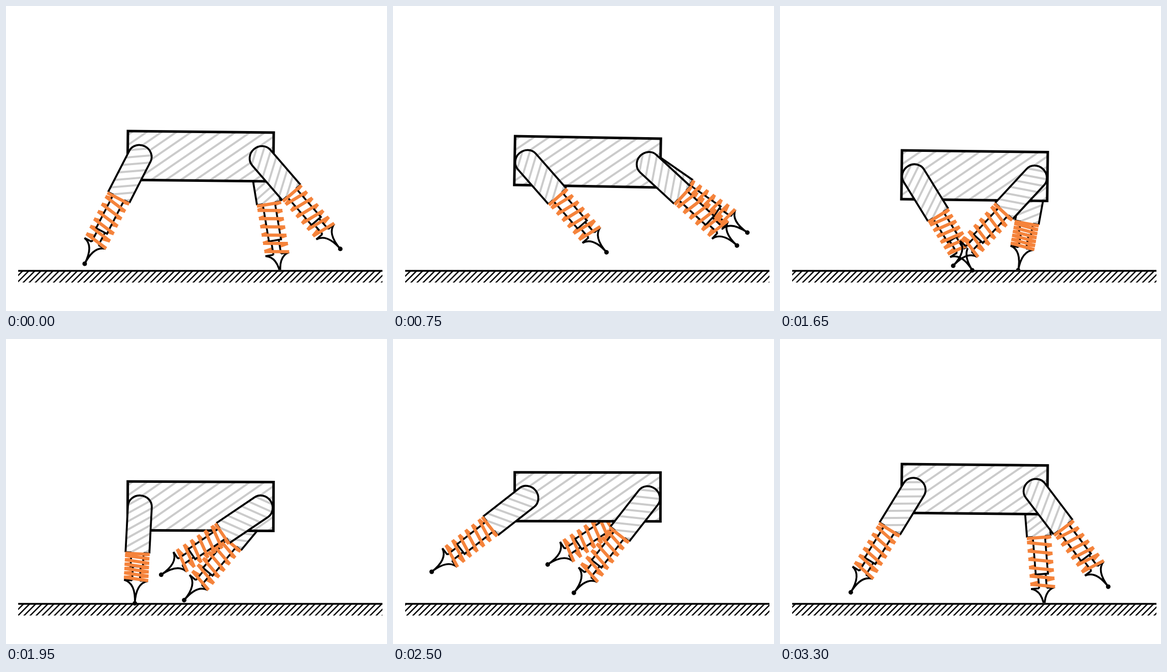
Animation, 750 px wide and 600 px high, one loop 3.35 s. Source, as an HTML page with a canvas:

```html
<!DOCTYPE html>
<html lang="en">
<head>
<meta charset="utf-8">
<title>Spring-legged runner</title>
<style>
html, body { margin: 0; width: 100%; height: 100%; overflow: hidden; background: #fff; }
canvas { display: block; width: 750px; height: 600px; }
</style>
</head>
<body>
<canvas id="stage" width="750" height="600"></canvas>
<script>
const ctx = document.getElementById('stage').getContext('2d');
const LOOP = 3350, STEP = 50, OMEGA = 2 * Math.PI / LOOP, RAD = Math.PI / 180;
const BLACK = '#000', GREY = '#cbcbcb', ORANGE = '#f5833b';
const GROUND = { left: 24, right: 741, top: 521, bottom: 544, gap: 11.95 };
const BODY = { x: 383, w: 287, h: 96, hipX: 119.5, hipY: 1.5 };
const LEG = { half: 23.5, upper: 91, foot: 45, rest: 237.6, sleeve: 12, rod: 7.5, cap: 27.5 };
const SPEED = 2 * (GROUND.right - GROUND.left) / LOOP;
const KEYS = [0, 750, 1200, 1650, 2200, 2850, 3300];

// Periodic cubic through the values at KEYS
function spline(values, t) {
  const n = KEYS.length;
  const at = i => values[(i + n) % n];
  const when = i => KEYS[(i + n) % n] + LOOP * Math.floor(i / n);
  const slope = i => (at(i + 1) - at(i - 1)) / (when(i + 1) - when(i - 1));
  let i = n - 1;
  while (KEYS[i] > t) i--;
  const h = when(i + 1) - when(i), u = (t - when(i)) / h, v = 1 - u;
  return at(i) * v * v * (1 + 2 * u) + at(i + 1) * u * u * (3 - 2 * u)
    + h * u * v * (slope(i) * v - slope(i + 1) * u);
}

// A basic wave plus a smooth correction that meets the given poses
function fit(wave, poses) {
  const rest = poses.map((p, i) => p - wave(KEYS[i]));
  return t => wave(t) + spline(rest, t);
}

const bodyY = fit(t => 314.5 + 19.2 * Math.cos(OMEGA * (t - 1680)),
  [295.5, 306.5, 321.7, 333.7, 320.5, 300, 295.3]);
const bodyTilt = fit(() => 0, [0.6, 0.98, 1.08, 0.7, 0, 0.38, 0.54]);

// mid: the moment of mid-stance
function makeLeg(side, mid, poses) {
  return { side, mid, angle: fit(t => -56 * Math.sin(OMEGA * (t - mid)), poses) };
}
const rear = makeLeg(-1, 1920, [-27.2, 41.3, 54.6, 31.7, -31.4, -55.5, -31.5]);
const near = makeLeg(1, 1255, [40.9, 47.3, 7.2, -42.8, -53.7, -5.7, 37.2]);
const far = makeLeg(1, 1575, [9.4, 55.2, 39.3, -10.4, -54.7, -37.2, 4.5]);

function pen(color, width) {
  ctx.strokeStyle = color;
  ctx.lineWidth = width;
}

function lines(...segments) {
  ctx.beginPath();
  for (const [x1, y1, x2, y2] of segments) {
    ctx.moveTo(x1, y1);
    ctx.lineTo(x2, y2);
  }
  ctx.stroke();
}

// Fill the current path with white and slanted grey lines
function hatch(gap, slant, reach) {
  ctx.fillStyle = '#fff';
  ctx.fill();
  ctx.save();
  ctx.clip();
  ctx.rotate(-slant * RAD);
  pen(GREY, 4);
  const rows = [];
  for (let y = -reach + reach % gap; y <= reach; y += gap) rows.push([-reach, y, reach, y]);
  lines(...rows);
  ctx.restore();
}

function upperPath() {
  const { half, upper } = LEG;
  ctx.beginPath();
  ctx.moveTo(-half, upper);
  ctx.lineTo(-half, 0);
  ctx.ellipse(0, 0, half, 22, 0, Math.PI, 2 * Math.PI);
  ctx.lineTo(half, upper);
}

function drawSpring(top, length, front) {
  const p = length / 12, w = 24, parts = [];
  if (front) parts.push([-w, top, w, top]);
  for (let i = 0; i < 12; i += 2) {
    const y = top + i * p;
    parts.push(front ? [-w, y + p, w, y + 2 * p] : [w, y, -w, y + p]);
  }
  pen(ORANGE, 6.3);
  lines(...parts);
}

function drawFoot(plate) {
  const { half, rod, foot, cap, sleeve } = LEG, tip = plate + foot;
  pen(BLACK, 3.6);
  lines([-half, plate, -rod, plate], [rod, plate, half, plate],
    [-rod, plate, -rod, plate - cap], [rod, plate, rod, plate - cap],
    [-sleeve - 2, plate - cap, sleeve + 2, plate - cap]);
  ctx.beginPath();
  for (const s of [-1, 1]) {
    ctx.moveTo(s * half, plate);
    ctx.quadraticCurveTo(0, plate + 5, 0, tip);
  }
  ctx.stroke();
  ctx.fillStyle = BLACK;
  ctx.beginPath();
  ctx.arc(0, tip, 4.5, 0, 2 * Math.PI);
  ctx.fill();
}

function drawLeg(leg, t, y, tilt) {
  const { half, upper, sleeve, cap } = LEG;
  const hx = leg.side * BODY.hipX;
  const hipX = BODY.x + hx * Math.cos(tilt) - BODY.hipY * Math.sin(tilt);
  const hipY = y + hx * Math.sin(tilt) + BODY.hipY * Math.cos(tilt);
  const angle = leg.angle(t) * RAD;
  // The leg is pressed against the ground only while it sweeps back
  const sweeping = Math.cos(OMEGA * (t - leg.mid)) > 0;
  const toGround = (GROUND.top - 1 - hipY) / Math.cos(angle);
  const length = sweeping ? Math.min(LEG.rest, toGround) : LEG.rest;
  const plate = length - LEG.foot, top = upper + 2, coil = plate - top - 1;

  ctx.save();
  ctx.translate(hipX, hipY);
  ctx.rotate(-angle);

  upperPath();
  hatch(14, 32, 130);
  upperPath();
  pen(BLACK, 3.8);
  ctx.stroke();
  lines([-half, upper, -sleeve, upper], [sleeve, upper, half, upper]);

  drawSpring(top, coil, false);
  ctx.fillStyle = '#fff';
  ctx.fillRect(-sleeve, upper + 1, 2 * sleeve, plate - cap - upper - 1);
  ctx.fillRect(-LEG.rod, plate - cap, 2 * LEG.rod, cap);
  pen(BLACK, 3.6);
  lines([-sleeve, upper, -sleeve, plate - cap], [sleeve, upper, sleeve, plate - cap]);
  drawFoot(plate);
  drawSpring(top, coil, true);
  ctx.restore();
}

function drawGround(t) {
  const { left, right, top, bottom, gap } = GROUND, h = bottom - top;
  ctx.save();
  ctx.beginPath();
  ctx.rect(left, top - 2, right - left, h + 2);
  ctx.fillStyle = '#fff';
  ctx.fill();
  ctx.clip();
  pen(BLACK, 2.5);
  const strokes = [];
  const start = 33 - (SPEED * t) % gap;
  for (let x = start; x < right + 40; x += gap) strokes.push([x, top, x - h - 2, bottom + 2]);
  lines(...strokes);
  pen(BLACK, 3.6);
  lines([left, top, right, top]);
  ctx.restore();
}

function drawBody(y, tilt) {
  const { x, w, h } = BODY;
  ctx.save();
  ctx.translate(x, y);
  ctx.rotate(tilt);
  ctx.beginPath();
  ctx.rect(-w / 2, -h / 2, w, h);
  hatch(16.5, 35, 200);
  pen(BLACK, 5);
  ctx.strokeRect(-w / 2, -h / 2, w, h);
  ctx.restore();
}

function draw(t) {
  const y = bodyY(t), tilt = bodyTilt(t) * RAD;
  ctx.fillStyle = '#fff';
  ctx.fillRect(0, 0, 750, 600);
  drawLeg(far, t, y, tilt);
  drawGround(t);
  drawBody(y, tilt);
  drawLeg(rear, t, y, tilt);
  drawLeg(near, t, y, tilt);
}

const begin = performance.now();
function tick() {
  const t = (performance.now() - begin) % LOOP;
  draw(Math.floor(t / STEP) * STEP);
  requestAnimationFrame(tick);
}
tick();
</script>
</body>
</html>
```
